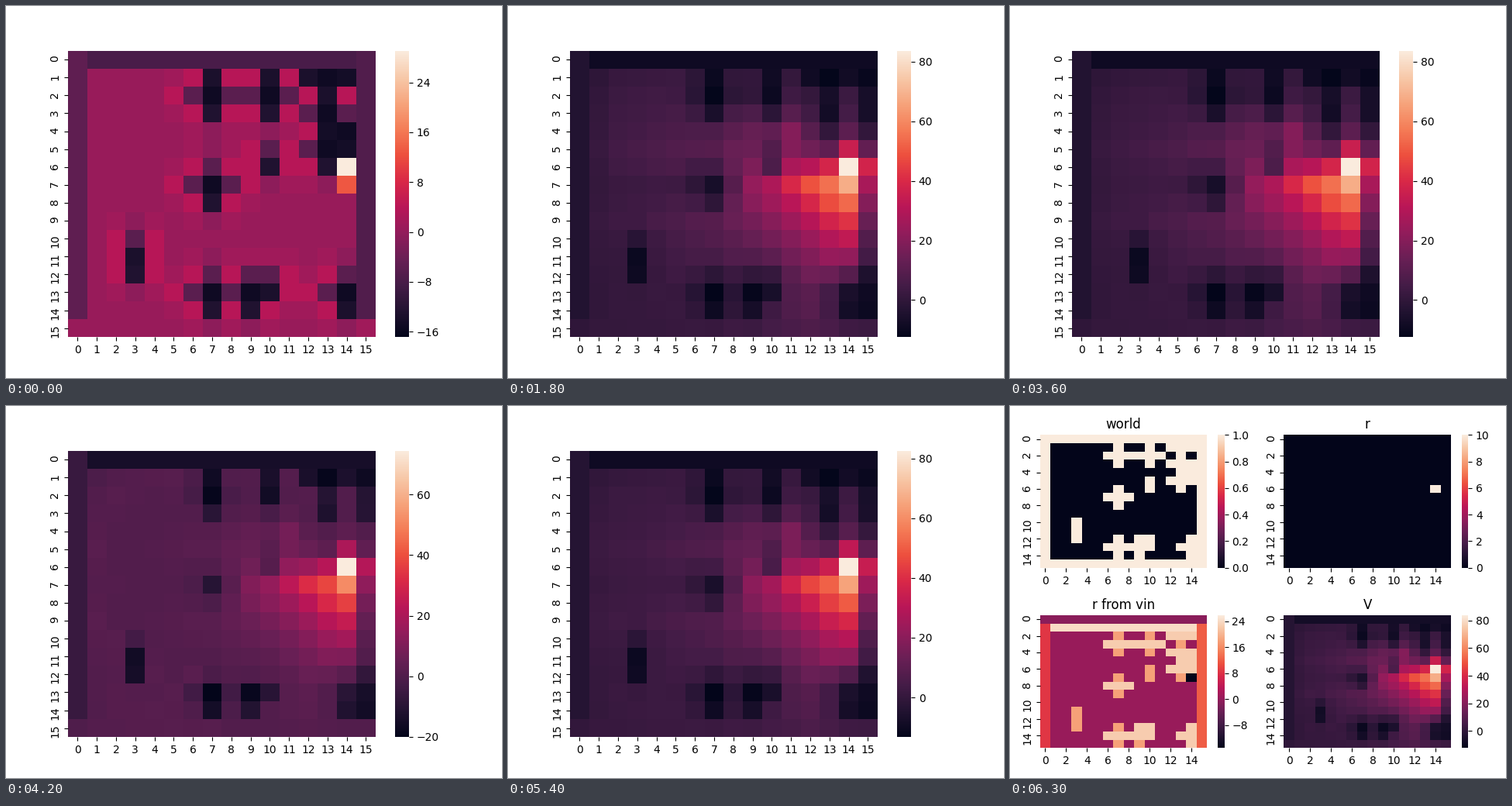
A matplotlib script for the animation above (6600 ms loop, 640 by 480 pixels).

```python
import numpy as np
import matplotlib.pyplot as plt
from matplotlib.animation import FuncAnimation
from matplotlib.colors import LinearSegmentedColormap
from matplotlib.ticker import MaxNLocator

N, FRAMES = 16, 22
ROCKET = LinearSegmentedColormap.from_list("rocket_like", [
    "#03051a", "#221331", "#451c47", "#691f55", "#921c5b", "#b91657",
    "#d92847", "#ed503e", "#f47d57", "#f6a47c", "#f7c9aa", "#faebdd"], N=256)
WORLD = """
################
#......#..#.####
#.....######.#.#
#......#..#.####
#............###
#.........#.####
#......#..#..#.#
#.....###......#
#......#.......#
#..............#
#..#...........#
#..#...........#
#..#...#.##...##
#.....#####..###
#......#.#....##
################
""".split()
GOAL, BELOW_GOAL = (6, 14), (7, 14)
STEPS = [(1, 0), (-1, 0), (0, 1), (0, -1)]
CORNERS = [(1, 1), (1, -1), (-1, 1), (-1, -1)]


def shift(grid, dr, dc=0):
    """Move a grid by whole cells, filling with empty cells."""
    padded = np.pad(grid, 1)
    return padded[1 - dr:1 - dr + N, 1 - dc:1 - dc + N]


def shifted(grid, moves):
    return np.array([shift(grid, *move) for move in moves])


world = np.array([[cell == "#" for cell in row] for row in WORLD])
# The bottom border behaves like open ground in the value maps.
wall = world.copy()
wall[-1] = False
above = shift(wall, 1)
wall_count = shifted(wall, STEPS).sum(axis=0)


def first_values():
    """Walls are low, most of all under other walls; their flanks glow."""
    inner = wall.copy()
    inner[0] = inner[:, 0] = inner[:, -1] = False
    vert, side = shifted(inner, STEPS).reshape(2, 2, N, N).any(axis=1)
    diag = shifted(inner, CORNERS).any(axis=0)
    v = np.select([wall & above, wall, side, diag, vert],
                  [-12 - 0.8 * wall_count, -6, 3.8, 1.4, -0.7], 0.4)
    v[0] = -8
    v[:15, 0] = -5.5
    v[:15, 15] = -7
    v[BELOW_GOAL] = 13
    v[GOAL] = 29
    return v


def learned_values():
    """Spread the goal's worth step by step; walls pass on less of it."""
    decay = np.array([0.79, 0.79, 0.81, 0.81])[:, None, None]
    worth = np.zeros((N, N))
    worth[GOAL] = 95
    for _ in range(4 * N):
        best = (decay * shifted(worth, STEPS)).max(axis=0)
        worth = np.maximum(worth, best * np.where(wall, 0.62, 1))
    v = np.where(wall, worth - 4 - 5 * above - (wall_count - 1),
                 worth * (1 - 0.08 * wall_count) - 0.8 * wall_count)
    v[0] = -7.5
    v[:15, 0] = -3
    v[GOAL] = 84
    return v


def learned_reward():
    """The wall map one row down, strongest where walls lie side by side."""
    beside = shifted(world, STEPS[2:]).any(axis=0)
    r = shift(np.select([world & beside, world], [22.5, 18.0], 0.3), 1)
    r[0] = -1
    r[1] = 24
    r[1:, 0] = 8.5
    r[1:, 15] = 12
    r[BELOW_GOAL] = -15.1
    return r


FIRST, LEARNED, REWARD = first_values(), learned_values(), learned_reward()
# How far the learned map is weakened, by frame.
WEAK_FRAMES = [1, 3, 10, 11, 12, 13, 14, 15, 16, 17, 20]
WEAKNESS = [0.2, 0, 0, 2.65, 0, 0.7, 2.65, 0.8, 1, 0.4, 0.1]


def values_at(frame):
    if frame == 0:
        return FIRST, (-16.87, 29.1)
    weak = np.interp(frame, WEAK_FRAMES, WEAKNESS)
    lo, hi = -12.4 - 2.9 * weak, 83.65 - 3.45 * weak
    v = LEARNED.copy()
    v[1:7, 2:6] += 2 * np.clip((10 - frame) / 7, 0, 1)
    middle = np.sin(np.pi * np.clip((v - 2) / 82, 0, 1))
    v -= 11 * min(weak, 1.2) * np.sqrt(np.clip(middle, 0, 1))
    return np.interp(v, [v.min(), 0, v.max()], [lo, 0, hi]), (lo, hi)


fig = plt.figure(figsize=(6.4, 4.8), dpi=100)


def heatmap(ax, values, limits, step=1, title=""):
    mesh = ax.pcolormesh(values, cmap=ROCKET, vmin=limits[0], vmax=limits[1])
    ticks = np.arange(0, N, step)
    ax.set(xlim=(0, N), ylim=(N, 0), title=title)
    ax.set_xticks(ticks + 0.5, ticks)
    ax.set_yticks(ticks + 0.5, ticks, rotation=90)
    ax.spines[:].set_visible(False)
    bar = fig.colorbar(mesh, ax=ax, ticks=MaxNLocator(6))
    bar.outline.set_linewidth(0)


def summary():
    goal_map = np.zeros((N, N))
    goal_map[GOAL] = 10
    panels = [("world", world.astype(float), (0, 1)),
              ("r", goal_map, (0, 10)),
              ("r from vin", REWARD, (-15.1, 25.9)),
              ("V", LEARNED, (-12.5, 84))]
    for ax, (title, values, limits) in zip(fig.subplots(2, 2).flat, panels):
        heatmap(ax, values, limits, 2, title)
    fig.tight_layout()


def draw(frame):
    fig.clear()
    fig.subplots_adjust(left=0.125, right=0.9, bottom=0.11, top=0.88,
                        wspace=0.2, hspace=0.2)
    if frame == FRAMES - 1:
        summary()
    else:
        heatmap(fig.subplots(), *values_at(frame))
    return fig.axes


anim = FuncAnimation(fig, draw, frames=FRAMES, interval=300,
                     init_func=lambda: [], repeat=True, repeat_delay=0)
plt.show()
```
